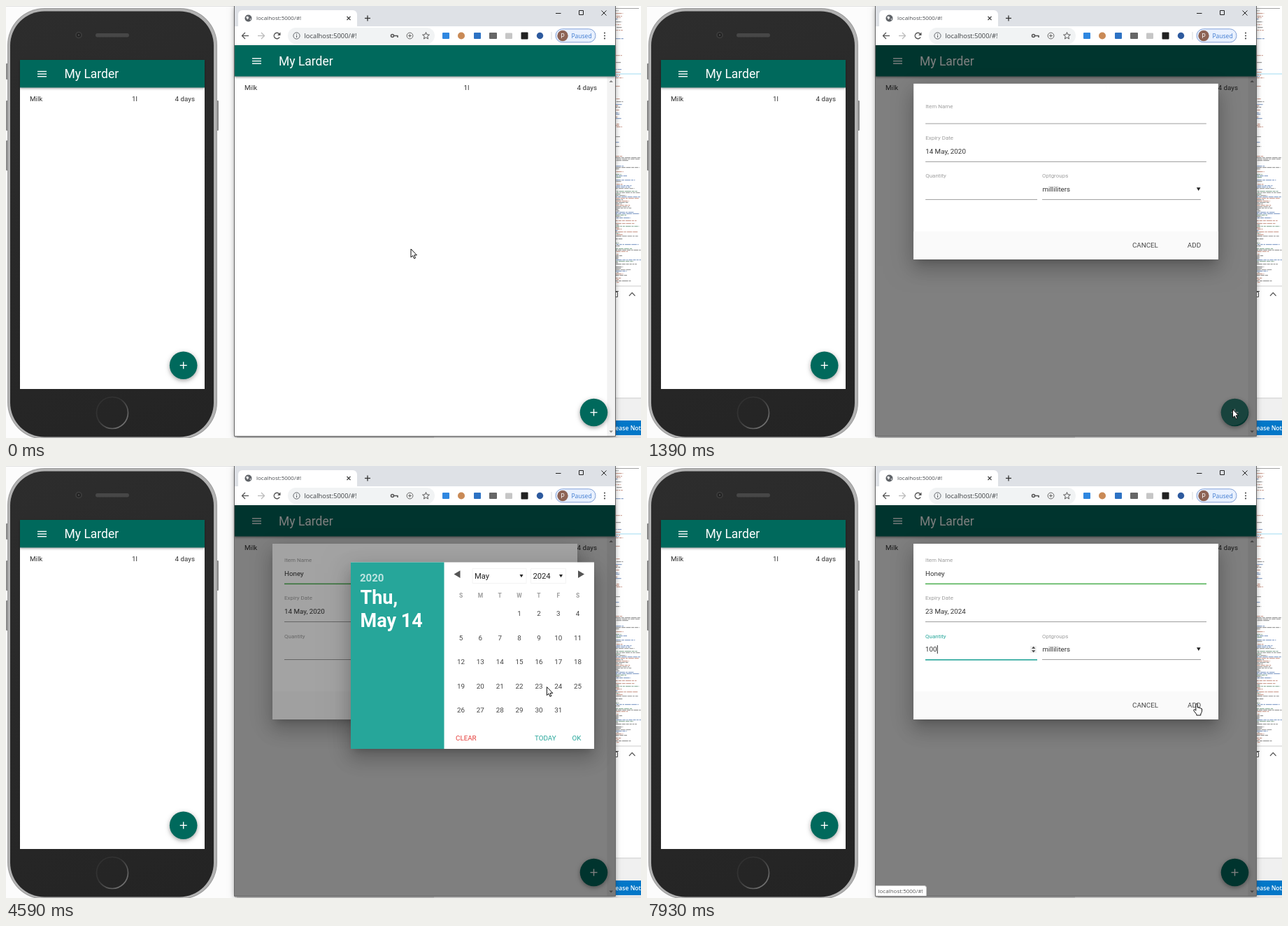
These frames come from a looping animation (908 by 617 pixels, 8000 ms). An HTML page with a canvas:

```html
<!DOCTYPE html>
<html lang="en">
<head>
<meta charset="utf-8">
<title>Larder app</title>
<style>
html, body { margin: 0; width: 100%; height: 100%; overflow: hidden; background: #fcfcfc; }
canvas { display: block; width: 908px; height: 617px; }
</style>
</head>
<body>
<canvas id="stage" width="908" height="617"></canvas>
<script>
const ctx = document.getElementById('stage').getContext('2d');
const LOOP = 8000;
const GREEN = '#00695c', TEAL = '#26a69a', INK = '#333', MUTED = '#9e9e9e';
const ROBOTO = 'Roboto, sans-serif', UI = '"Open Sans", sans-serif';
const BODY = 9.8;
const TITLE = 'My Larder', URL_TEXT = 'localhost:5000/#!';

const clamp = v => Math.max(0, Math.min(1, v));
const phase = (t, start, dur) => clamp((t - start) / dur);
const easeOut = p => 1 - (1 - p) ** 3;
const smooth = p => p * p * (3 - 2 * p);
const mix = (a, b, p) => a + (b - a) * p;

function rect(x, y, w, h, color) {
  ctx.fillStyle = color;
  ctx.fillRect(x, y, w, h);
}
function round(x, y, w, h, r, color) {
  ctx.fillStyle = color;
  ctx.beginPath();
  ctx.roundRect(x, y, w, h, r);
  ctx.fill();
}
function disc(x, y, r, color, ry = r) {
  ctx.fillStyle = color;
  ctx.beginPath();
  ctx.ellipse(x, y, r, ry, 0, 0, Math.PI * 2);
  ctx.fill();
}
function ring(x, y, r, color, w = 1) {
  ctx.strokeStyle = color;
  ctx.lineWidth = w;
  ctx.beginPath();
  ctx.arc(x, y, r, 0, Math.PI * 2);
  ctx.stroke();
}
function path(points, x = 0, y = 0, close = false) {
  ctx.beginPath();
  points.forEach(([px, py], i) => ctx[i ? 'lineTo' : 'moveTo'](x + px, y + py));
  if (close) ctx.closePath();
}
function line(points, color, w = 1) {
  path(points);
  ctx.strokeStyle = color;
  ctx.lineWidth = w;
  ctx.stroke();
}
function poly(points, color) {
  path(points, 0, 0, true);
  ctx.fillStyle = color;
  ctx.fill();
}
// y is the baseline
function text(s, x, y, size, color, { align = 'left', weight = 400, font = ROBOTO } = {}) {
  ctx.font = `${weight} ${size}px ${font}`;
  ctx.textAlign = align;
  ctx.fillStyle = color;
  ctx.fillText(s, x, y);
}
function shadowed(blur, dy, alpha, draw) {
  ctx.save();
  ctx.shadowColor = `rgba(0,0,0,${alpha})`;
  ctx.shadowBlur = blur;
  ctx.shadowOffsetY = dy;
  draw();
  ctx.restore();
}
function randomizer(seed) {
  return () => (seed = (seed * 16807) % 2147483647) / 2147483647;
}

// dy, blur, spread, alpha
const DEPTH = [[16, 25, 2, .14], [6, 31, 5, .12], [7, 10, -5, .2]];

// White panel whose shadow stays outside it, so it can fade cleanly
function panel(x, y, w, h) {
  const far = 2000;
  ctx.save();
  ctx.beginPath();
  ctx.rect(-far, -far, 3 * far, 3 * far);
  ctx.rect(x, y, w, h);
  ctx.clip('evenodd');
  for (const [dy, blur, spread, alpha] of DEPTH) {
    shadowed(blur, dy, alpha, () => {
      ctx.shadowOffsetX = far * ctx.getTransform().a;
      rect(x - far - spread, y - spread, w + 2 * spread, h + 2 * spread, '#000');
    });
  }
  ctx.restore();
  rect(x, y, w, h, '#fff');
}

function menuIcon(x, y) {
  for (let i = 0; i < 3; i++) rect(x, y + i * 3.6, 13, 1.4, '#fff');
}
function fab(x, y) {
  shadowed(6, 2, .38, () => disc(x, y, 19.8, GREEN));
  rect(x - 5, y - .7, 10, 1.4, '#fff');
  rect(x - .7, y - 5, 1.4, 10, '#fff');
}

function drawPhone() {
  for (const [y, h] of [[82, 23], [135, 43], [192, 43]]) round(0, y, 4, h, 1, '#8b8b8b');
  round(300, 135, 4, 43, 1, '#8b8b8b');
  round(2, 3, 300, 616, 53, '#9a9a9a');
  round(3, 4, 298, 614, 52, '#b2b2b2');
  const shell = ctx.createLinearGradient(20, 0, 290, 600);
  shell.addColorStop(0, '#2d2d2d');
  shell.addColorStop(1, '#242424');
  round(6, 7.5, 291, 608, 49, shell);
  disc(104, 41.5, 5, '#3a3a3a');
  disc(104, 41.5, 3, '#202020');
  disc(104, 41.5, 1.3, '#4b4b4b');
  round(128, 39, 48, 5.5, 2.7, '#474747');
  const glow = ctx.createLinearGradient(134, 562, 170, 600);
  glow.addColorStop(0, '#303030');
  glow.addColorStop(.4, '#343434');
  glow.addColorStop(1, '#777');
  ring(152, 581, 22.5, glow, 1.7);

  rect(20, 77, 264, 470, '#fff');
  shadowed(3, 1, .35, () => rect(20, 77, 264, 39.5, GREEN));
  menuIcon(45, 92.8);
  text(TITLE, 83.5, 103, 17.5, '#fff');
  text('Milk', 34, 135.5, BODY, INK);
  text('1l', 180, 135.5, BODY, INK);
  text('4 days', 270, 135.5, BODY, INK, { align: 'right' });
  fab(253.7, 513.3);
}

function drawEditor() {
  rect(871, 0, 37, 617, '#fff');
  const rnd = randomizer(77);
  const colors = ['#555', '#b0644f', '#3f68a8', '#666', '#4a7f5f'];
  ctx.globalAlpha = .6;
  rect(871, 3, 34, 1, '#666');
  for (let y = 6; y < 396; y += 2) {
    const dense = y > 214;
    if (rnd() > (dense ? .82 : .3)) continue;
    const wide = dense && rnd() > .45 || y > 50 && y < 70;
    let x = 871 + rnd() * 2;
    const end = x + (wide ? 14 + rnd() * 22 : 3 + rnd() * 8);
    const color = colors[Math.floor(rnd() * (dense ? 5 : 3))];
    while (x < end) {
      const w = 2 + rnd() * 7;
      rect(x, y, Math.min(w, end - x), 1.2, color);
      x += w + 1;
    }
  }
  ctx.globalAlpha = 1;
  rect(871, 96.5, 37, 1, '#9fdcf2');
  rect(871, 399.5, 37, 1, '#ccc');
  ctx.strokeStyle = '#555';
  ctx.lineWidth = 1;
  ctx.strokeRect(869.5, 408.5, 5, 7);
  line([[868, 407.5], [876, 407.5]], '#555');
  line([[891, 414], [895.3, 409.5], [899.5, 414]], '#555', 1.1);
  rect(871, 560, 37, 57, '#f0f0f0');
  rect(871, 559.5, 37, 1, '#ccc');
  rect(871, 592, 37, 21, '#0277c8');
  text('elease Not', 908, 605.8, 8.6, '#fff', { align: 'right', font: UI, weight: 600 });
  rect(327, 614, 581, 3, '#e3e3e3');
  rect(330, 615, 282, 2, '#cfcfcf');
}

function drawTabs() {
  rect(327, 0, 544, 30, '#dee1e6');
  round(332, 6, 170, 30, [6, 6, 0, 0], '#fff');
  rect(327, 29, 544, 27, '#fff');
  disc(346.5, 17.5, 5, '#5f6368');
  poly([[343, 15.5], [346, 14.5], [347.5, 17], [345, 19.5]], '#e6e6e6');
  poly([[348.5, 18.5], [350.5, 17.5], [349.5, 20.5]], '#e6e6e6');
  text(URL_TEXT, 358, 20.4, 8, '#4a4d51', { font: UI });
  line([[487.5, 15], [492.5, 20]], '#444', 1.2);
  line([[492.5, 15], [487.5, 20]], '#444', 1.2);
  line([[513, 17.5], [521, 17.5]], '#333', 1.3);
  line([[517, 13.5], [517, 21.5]], '#333', 1.3);
  line([[786, 10.5], [793.5, 10.5]], '#222');
  ctx.strokeStyle = '#222';
  ctx.lineWidth = 1;
  ctx.strokeRect(819.5, 6.5, 6, 6);
  line([[851.5, 6.5], [858.5, 13.5]], '#222');
  line([[858.5, 6.5], [851.5, 13.5]], '#222');
}

function drawToolbar() {
  line([[347, 42.5], [337.5, 42.5]], '#555', 1.3);
  line([[342, 38], [337.5, 42.5], [342, 47]], '#555', 1.3);
  line([[360, 42.5], [369.5, 42.5]], '#bbb', 1.3);
  line([[365, 38], [369.5, 42.5], [365, 47]], '#bbb', 1.3);
  ctx.beginPath();
  ctx.arc(387.5, 42.5, 4.2, .5, 5.6);
  ctx.strokeStyle = '#555';
  ctx.lineWidth = 1.4;
  ctx.stroke();
  poly([[392.5, 37.5], [392.5, 42], [388, 42]], '#555');

  round(403, 31, 210, 23, 11.5, '#f1f3f4');
  ring(415.5, 42.5, 4.6, '#5f6368');
  rect(415, 41.8, 1.1, 3.2, '#5f6368');
  rect(415, 39.8, 1.1, 1.1, '#5f6368');
  text(URL_TEXT, 426.5, 45.8, 9.35, '#3c4043', { font: UI });
  ring(552.5, 42.5, 2, '#555', 1.6);
  line([[555, 42.5], [560, 42.5], [560, 45]], '#555', 1.6);
  ring(577.5, 42.5, 4.4, '#666');
  line([[575.2, 42.5], [579.8, 42.5]], '#666');
  line([[577.5, 40.2], [577.5, 44.8]], '#666');
  const star = Array.from({ length: 10 }, (_, i) => {
    const a = i * Math.PI / 5 - Math.PI / 2, r = i % 2 ? 2.3 : 5.2;
    return [Math.cos(a) * r, Math.sin(a) * r];
  });
  path(star, 600.5, 42.7, true);
  ctx.strokeStyle = '#555';
  ctx.lineWidth = 1;
  ctx.stroke();

  round(624, 38, 10, 9, 1, '#2f87e0');
  disc(651, 42.5, 5, '#c98a56');
  round(669, 38, 10, 9, 1, '#2d72c4');
  round(691, 38, 11, 9, 1, '#666');
  round(714, 38.5, 10, 8.5, 1, '#c6c6c6');
  round(736.5, 37.5, 10, 10, 1, '#222');
  disc(763.5, 42.5, 4.7, '#2d5a9e');
  rect(779.5, 37, 1, 11, '#d6d9dc');
  round(786, 32.8, 57, 19, 9.5, '#e8f0fe');
  ctx.strokeStyle = '#7f9fd6';
  ctx.lineWidth = 1;
  ctx.stroke();
  disc(796, 42.5, 7.7, '#8d6355');
  text('P', 796, 45.6, 8.5, '#fff', { align: 'center' });
  text('Paused', 808.5, 45.6, 8.5, '#3a78d0', { font: UI });
  for (const y of [38.6, 42.5, 46.4]) disc(856, y, 1.1, '#555');
}

function drawPage(t) {
  rect(327, 56, 544, 558, '#fff');
  rect(859.5, 101, 11.5, 513, '#f2f2f2');
  shadowed(3, 1, .4, () => rect(327, 56, 544, 44.5, GREEN));
  menuIcon(352, 74.3);
  text(TITLE, 390, 84.5, 17.5, '#fff');
  text('Milk', 341, 120, BODY, INK);
  text('1l', 654.5, 120, BODY, INK);
  text('4 days', 845, 120, BODY, INK, { align: 'right' });
  poly([[862.5, 109], [868, 109], [865.2, 106]], '#888');
  poly([[862.5, 606.5], [868, 606.5], [865.2, 609.5]], '#888');
  fab(840.5, 580.5);

  const ripple = phase(t, 1100, 600);
  if (ripple > 0 && ripple < 1) {
    ctx.save();
    ctx.beginPath();
    ctx.arc(840.5, 580.5, 19.8, 0, 7);
    ctx.clip();
    disc(838.5, 577.5, 21.5 * easeOut(phase(t, 1100, 250)), `rgba(255,255,255,${.5 * (1 - ripple) ** 1.5})`);
    ctx.restore();
  }
}

function underline(x, w, y, color, weight = 1) {
  rect(x, y, w, weight, color);
}
function caret(t, since, x, y) {
  if ((t - since) % 1060 < 530 || t > 7800) rect(x, y, 1, 12, '#333');
}

function drawForm(t) {
  const open = easeOut(phase(t, 1202, 220));
  if (!open) return;
  rect(327, 56, 544, 558, `rgba(0,0,0,${.5 * open})`);
  ctx.save();
  ctx.globalAlpha = open;
  const sx = mix(.7, 1, open);
  ctx.translate(599 * (1 - sx), -33 * (1 - open));
  ctx.scale(sx, 1);
  panel(381, 111, 436, 251);
  rect(381, 322, 436, 40, '#fafafa');

  const itemFocus = t > 2220 && t < 3040;
  const qtyFocus = t > 6600;
  const honey = 'Honey'.slice(0, t < 2300 ? 0 : 1 + Math.floor((t - 2300) / 110));
  const lift = easeOut(phase(t, 2220, 200));
  text('Item Name', 398, mix(146, 137, lift), 8, itemFocus ? TEAL : MUTED);
  text(honey, 398, 156.8, BODY, INK);
  if (itemFocus) caret(t, 2220, 398.5 + ctx.measureText(honey).width, 147);
  const itemColor = itemFocus ? TEAL : t >= 3040 ? '#4caf50' : MUTED;
  underline(398, 402, 167.6, itemColor, t > 2220 ? 1.5 : 1);

  text('Expiry Date', 398, 191.3, 8, MUTED);
  text(t < 4880 ? '14 May, 2020' : '23 May, 2024', 398, 211, BODY, INK);
  underline(398, 402, 222, MUTED);

  text('Quantity', 398, 245.5, 8, qtyFocus ? TEAL : MUTED);
  underline(398, 160, 276, qtyFocus ? TEAL : MUTED, qtyFocus ? 1.6 : 1);
  if (qtyFocus) {
    const qty = '100'.slice(0, t < 7000 ? 0 : 1 + Math.floor((t - 7000) / 150));
    text(qty, 398, 265.3, BODY, INK);
    caret(t, 6600, 398.3 + ctx.measureText(qty).width, 256);
    rect(548, 257, 9, 10, '#f0f0f0');
    poly([[550, 260.8], [555.4, 260.8], [552.7, 257.8]], '#444');
    poly([[550, 263.2], [555.4, 263.2], [552.7, 266.2]], '#444');
  }

  text('Optgroups', 565, 245.5, 8, MUTED);
  text('milliliters', 565.5, 264.8, BODY, INK);
  poly([[786, 259.3], [791.6, 259.3], [788.8, 264]], '#222');
  underline(565, 227, 276, MUTED);
  text('CANCEL', 694, 345.2, BODY, '#444');
  text('ADD', 773, 345.2, BODY, '#444');
  ctx.restore();
}

function drawSelect(label, x, w) {
  ctx.strokeStyle = '#f3f3f3';
  ctx.lineWidth = 1;
  ctx.strokeRect(x + .5, 146.5, w, 21);
  text(label, x + 3.5, 161, 11.2, '#222');
  poly([[x + w - 9, 155], [x + w - 4, 155], [x + w - 6.5, 159.3]], '#222');
}

function drawCalendar(t) {
  const late = t >= 4480, picked = t >= 4880;
  const first = late ? 3 : 5;
  const bottom = late ? 404 : 438.5;
  panel(493, 137.5, 348, bottom - 137.5);
  rect(493, 137.5, 133.5, bottom - 137.5, TEAL);
  text(picked ? '2024' : '2020', 506, 164.5, 15, 'rgba(255,255,255,.7)', { weight: 600 });
  text('Thu,', 506.5, 196.8, 27, '#fff', { weight: 600 });
  text(picked ? 'May 23' : 'May 14', 506.5, 229.8, 27, '#fff', { weight: 600 });

  poly([[649.5, 149.3], [649.5, 160], [640.5, 154.6]], '#555');
  poly([[818, 149.3], [818, 160], [827, 154.6]], '#555');
  drawSelect('May', 666.5, 77);
  drawSelect(late ? '2024' : '2020', 750, 50);

  const colX = i => 650.5 + 27.85 * i;
  [...'SMTWTFS'].forEach((d, i) =>
    text(d, colX(i), 187.7, 8.5, MUTED, { align: 'center', weight: 600 }));
  const chosen = picked ? 23 : late ? 0 : 14;
  for (let day = 1; day <= 31; day++) {
    const cell = first + day - 1;
    const x = colX(cell % 7), y = 210.7 + 34.55 * Math.floor(cell / 7);
    const on = day === chosen;
    if (on) disc(x, y + .4, 12.4, TEAL, 15.6);
    text(day, x, y + 3.4, BODY, on ? '#fff' : '#444', { align: 'center', weight: on ? 600 : 400 });
  }

  const base = bottom - 12.3;
  if (t > 5540) rect(800, bottom - 29, 34, 26, '#c9e9e6');
  text('CLEAR', 643, base, BODY, '#e53935');
  text('TODAY', 756, base, BODY, TEAL);
  text('OK', 809.5, base, BODY, TEAL);
}

function drawYears(t, cursorY) {
  if (t < 4040 || t >= 4480) return;
  const top = 166, step = 10.35;
  rect(750, top, 51, step * 21 + 1, '#fff');
  const over = Math.floor((cursorY - top) / step);
  const active = over < 0 ? 10 : over;
  for (let i = 0; i < 21; i++) {
    const y = top + i * step;
    if (i === active) rect(750, y, 51, step, '#1e90ff');
    text(2010 + i, 753.5, y + 8.9, 9.8, i === active ? '#fff' : '#222');
  }
  ctx.strokeStyle = '#777';
  ctx.lineWidth = 1;
  ctx.strokeRect(750.5, top + .5, 50, step * 21);
}

function drawPicker(t, cursorY) {
  const shown = easeOut(phase(t, 3070, 230)) * (1 - easeOut(phase(t, 5730, 230)));
  if (!shown) return;
  rect(381, 111, 436, 251, `rgba(0,0,0,${.36 * shown})`);
  ctx.save();
  ctx.beginPath();
  ctx.rect(327, 56, 544, 558);
  ctx.clip();
  ctx.globalAlpha = shown;
  const sx = mix(.7, 1, shown);
  ctx.translate(667 * (1 - sx), -26 * (1 - shown));
  ctx.scale(sx, 1);
  drawCalendar(t);
  ctx.restore();
  drawYears(t, cursorY);
}

// time, x, y
const MOVES = [
  [0, 579, 347], [80, 579, 347], [840, 837.5, 576], [1740, 837.5, 576],
  [2200, 560, 151], [2880, 560, 151], [3020, 541, 205], [3510, 541, 205],
  [3650, 710, 147.5], [3720, 710, 147.5], [3950, 776, 153], [4080, 776, 153],
  [4320, 776, 316], [4500, 776, 316], [4800, 764, 314], [5190, 764, 314],
  [5580, 822, 390], [6000, 822, 390], [6360, 523.5, 288.5], [6560, 470, 261],
  [7380, 470, 261], [7810, 786, 340], [8000, 786, 340]
];
function cursorAt(t) {
  const i = Math.max(1, MOVES.findIndex(m => m[0] > t));
  const [t0, x0, y0] = MOVES[i - 1], [t1, x1, y1] = MOVES[i];
  const p = smooth(phase(t, t0, t1 - t0));
  return [mix(x0, x1, p), mix(y0, y1, p)];
}

const ARROW = [[0, 0], [0, 12], [2.7, 9.5], [4.6, 13.7], [6.5, 12.9], [4.7, 8.8], [8.4, 8.8]];
const HAND = [[-1.2, .3], [0, -.5], [1.2, .3], [1.2, 5], [3, 4.8], [3.6, 5.7], [5.3, 5.4], [6, 6.5],
  [7.2, 6.5], [7.6, 8], [7.2, 11.5], [5.8, 14], [5.8, 16], [-.2, 16], [-.2, 14.5], [-4.3, 9.3],
  [-3.7, 7.8], [-2.4, 8], [-1.2, 9.3]];

function drawCursor(t, x, y) {
  const typing = t > 2180 && t < 2890 || t > 6540 && t < 7400;
  if (typing) {
    line([[x, y - 5], [x, y + 6]], '#333');
    line([[x - 2, y - 5.5], [x + 2, y - 5.5]], '#333');
    line([[x - 2, y + 6.5], [x + 2, y + 6.5]], '#333');
    return;
  }
  path(t > 7800 ? HAND : ARROW, x, y, true);
  ctx.fillStyle = '#fff';
  ctx.fill();
  ctx.strokeStyle = '#111';
  ctx.lineWidth = 1;
  ctx.lineJoin = 'round';
  ctx.stroke();
}

function drawStatus() {
  round(326.5, 599.5, 73, 15, [0, 3, 0, 0], '#fff');
  ctx.strokeStyle = '#c4c4c4';
  ctx.lineWidth = 1;
  ctx.stroke();
  text(URL_TEXT, 330.5, 609.8, 8, '#555', { font: UI });
}

function render(t) {
  const [x, y] = cursorAt(t);
  rect(0, 0, 908, 617, '#fcfcfc');
  rect(0, 0, 327, 1, '#e2e2e2');
  drawPhone();
  drawEditor();
  shadowed(8, 2, .4, () => rect(327, 0, 544, 614, '#fff'));
  drawTabs();
  drawToolbar();
  drawPage(t);
  drawForm(t);
  drawPicker(t, y);
  if (t >= 7850) drawStatus();
  ctx.strokeStyle = '#666';
  ctx.lineWidth = 1;
  ctx.strokeRect(326.5, -.5, 545, 615);
  drawCursor(t, x, y);
}

const start = performance.now();
function tick() {
  render((performance.now() - start) % LOOP);
  requestAnimationFrame(tick);
}
tick();
</script>
</body>
</html>
```
